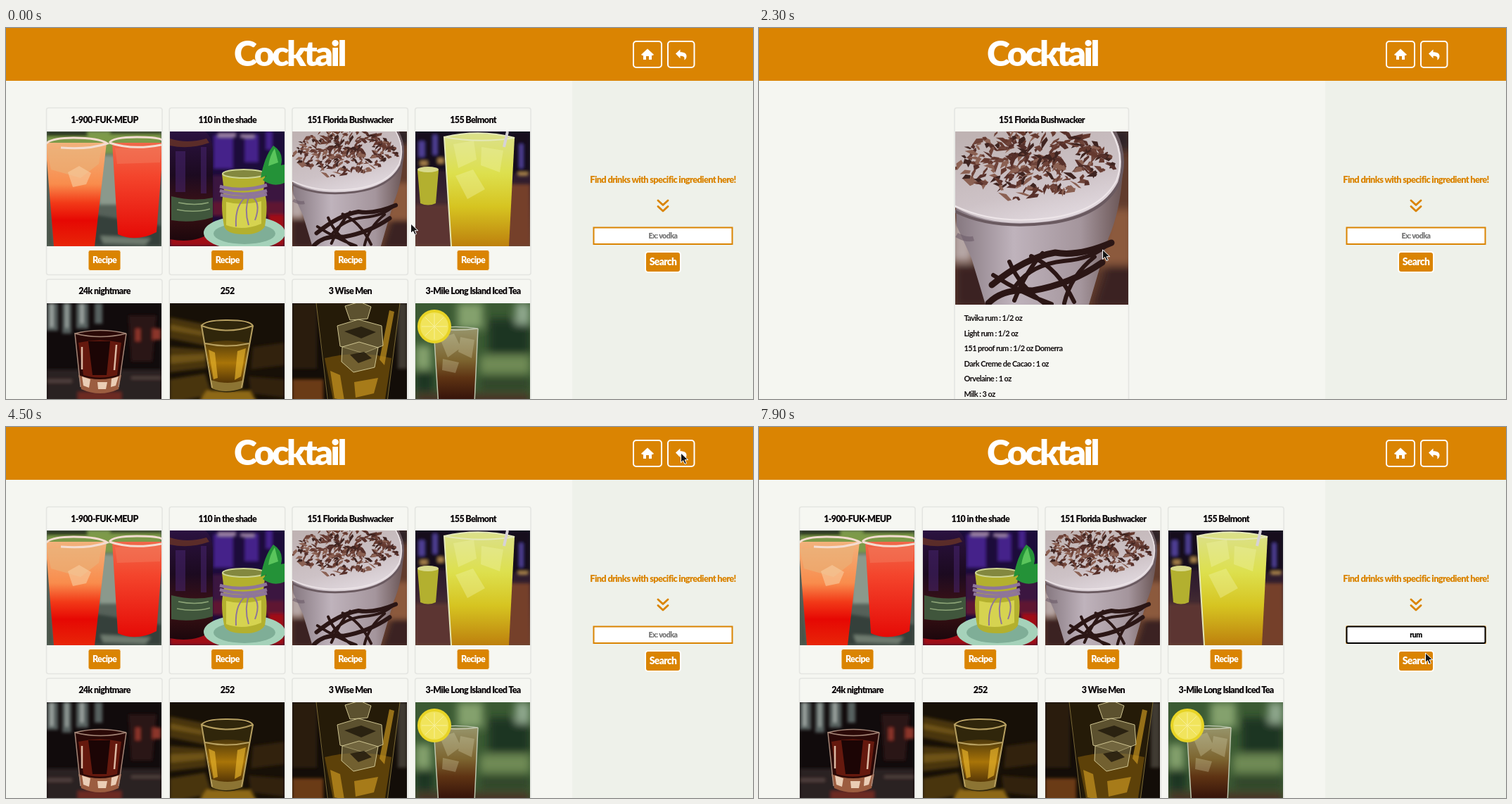
Write an HTML page that moves like this. It is 1062x527 px and loops after 8 s.

```html
<!DOCTYPE html>
<html lang="en">
<head>
<meta charset="utf-8">
<title>Cocktail</title>
<style>
html, body { margin: 0; width: 100%; height: 100%; overflow: hidden; background: #f5f6f1; }
svg.stage { display: block; width: 1062px; height: 527px; }
text { font-family: Lato, "Open Sans", sans-serif; font-weight: 900; letter-spacing: -.05em; text-anchor: middle; }
.title { font-size: 50px; letter-spacing: -.07em; fill: #fff; }
.name { font-size: 12.5px; fill: #0b0709; }
.btn { font-size: 12.5px; fill: #fff; }
.item { font-size: 11px; font-weight: 700; fill: #100b0c; text-anchor: start; }
.field { font-size: 10.5px; }
.card { fill: #f6f7f2; stroke: #e4e5e1; stroke-width: 1.6; }
.recipe { fill: #da8402; stroke: #fbf3e4; }

/* One loop lasts 8 s, so 1.25% is 100 ms. */
.list, .detail, .arrow, .beam, .caret, .hint, .typed, .focus { animation: 8s step-end infinite; }
.list { animation-name: list; }
.detail { animation-name: detail; }
.arrow { animation-name: arrow; }
.beam { animation-name: beam; }
.caret { animation-name: caret; }
.hint { animation-name: hint; }
.focus { animation-name: focus; }
.t1 { animation-name: t1; }
.t2 { animation-name: t2; }
.t3 { animation-name: t3; }

@keyframes list { 0%, 56.25% { opacity: 1 } 17.5% { opacity: 0 } 100% { opacity: 1 } }
@keyframes detail { 0%, 52.5%, 100% { opacity: 0 } 17.5% { opacity: 1 } }
@keyframes focus { 0% { opacity: 0 } 68.75%, 100% { opacity: 1 } }
@keyframes hint { 0% { opacity: 1 } 81.25%, 100% { opacity: 0 } }
@keyframes t1 { 0%, 82.5%, 100% { opacity: 0 } 81.25% { opacity: 1 } }
@keyframes t2 { 0%, 85%, 100% { opacity: 0 } 82.5% { opacity: 1 } }
@keyframes t3 { 0% { opacity: 0 } 85%, 100% { opacity: 1 } }
@keyframes caret {
  0%, 76.25%, 92.5%, 100% { opacity: 0; transform: translate(935px, 289px) }
  68.75% { opacity: 1; transform: translate(935px, 289px) }
  81.25% { opacity: 1; transform: translate(937px, 289px) }
  82.5% { opacity: 1; transform: translate(940px, 289px) }
  85% { opacity: 1; transform: translate(944px, 289px) }
}
@keyframes beam {
  0%, 77.5%, 100% { opacity: 0; transform: translate(969px, 298px) }
  72.5% { opacity: 1; transform: translate(967px, 296px) }
  73.75% { opacity: 1; transform: translate(969px, 298px) }
}
@keyframes arrow {
  0% { opacity: 1; transform: translate(575px, 278px) }
  3.75% { transform: translate(551px, 288px) }
  5% { transform: translate(527px, 296px) }
  7.5% { transform: translate(508px, 312px) }
  8.75% { transform: translate(490px, 327px) }
  23.75% { transform: translate(486px, 322px) }
  28.75% { transform: translate(488px, 315px) }
  37.5% { opacity: 1; transform: translate(532px, 299px) }
  38.75% { opacity: 0; transform: translate(532px, 299px) }
  42.5% { opacity: 1; transform: translate(956px, 25px) }
  43.75% { transform: translate(957px, 31px) }
  45% { transform: translate(959px, 37px) }
  60% { transform: translate(960px, 60px) }
  61.25% { transform: translate(963px, 110px) }
  62.5% { transform: translate(966px, 170px) }
  63.75% { transform: translate(966px, 225px) }
  65% { transform: translate(963px, 262px) }
  66.25% { opacity: 1; transform: translate(960px, 282px) }
  72.5% { opacity: 0; transform: translate(960px, 282px) }
  95% { opacity: 1; transform: translate(961px, 293px) }
  96.25% { transform: translate(957px, 303px) }
  97.5% { transform: translate(952px, 313px) }
  98.75%, 100% { opacity: 1; transform: translate(947px, 321px) }
}
</style>
</head>
<body>
<svg class="stage" viewBox="0 0 1062 527">
  <defs>
    <filter id="soft" x="-20%" y="-20%" width="140%" height="140%"><feGaussianBlur stdDeviation="2"/></filter>
    <filter id="haze" x="-20%" y="-20%" width="140%" height="140%"><feGaussianBlur stdDeviation="6"/></filter>
    <linearGradient id="punch" x2="0" y2="1"><stop stop-color="#f2b27c"/><stop offset=".4" stop-color="#f98c4c"/><stop offset=".58" stop-color="#f23a18"/><stop offset=".75" stop-color="#e60803"/><stop offset="1" stop-color="#e82508"/></linearGradient>
    <linearGradient id="punch2" x2="0" y2="1"><stop stop-color="#f0684a"/><stop offset=".35" stop-color="#f4452c"/><stop offset="1" stop-color="#e50a06"/></linearGradient>
    <linearGradient id="lime" x2="0" y2="1"><stop stop-color="#dbe08a"/><stop offset=".35" stop-color="#dde04e"/><stop offset=".65" stop-color="#d6c421"/><stop offset="1" stop-color="#bd800d"/></linearGradient>
    <linearGradient id="bar" x2="0" y2="1"><stop stop-color="#150d24"/><stop offset=".5" stop-color="#35202f"/><stop offset="1" stop-color="#6b4a38"/></linearGradient>
    <linearGradient id="foam" x1=".2" x2=".7" y2="1"><stop stop-color="#bfb3b3"/><stop offset=".6" stop-color="#cdc2c6"/><stop offset="1" stop-color="#e4dce2"/></linearGradient>
    <linearGradient id="mug" x2="1"><stop stop-color="#85777f"/><stop offset=".35" stop-color="#bfb3bc"/><stop offset=".75" stop-color="#a4959c"/><stop offset="1" stop-color="#6a5555"/></linearGradient>
    <linearGradient id="bottle" x2="0" y2="1"><stop stop-color="#2b1240"/><stop offset=".4" stop-color="#1c0a20"/><stop offset=".7" stop-color="#3d1215"/><stop offset="1" stop-color="#1c070c"/></linearGradient>
    <linearGradient id="whisky" x2="0" y2="1"><stop stop-color="#4e390b"/><stop offset=".5" stop-color="#a87408"/><stop offset="1" stop-color="#4c2f06"/></linearGradient>
    <linearGradient id="tea" x2="0" y2="1"><stop stop-color="#97946a"/><stop offset=".35" stop-color="#7d6530"/><stop offset=".55" stop-color="#5e3313"/><stop offset=".8" stop-color="#34120a"/><stop offset="1" stop-color="#240c08"/></linearGradient>

    <symbol id="p0" viewBox="0 0 163 163">
      <path fill="#566159" d="M0 0h163v163H0z"/>
      <g filter="url(#soft)"><path fill="#7d9a48" d="M0 0h163v32H0z"/><path fill="#26311f" d="M0 0h58v7H0zM90 0h73v4H90z"/><path fill="#8b998c" d="M74 34h24l6 70H74z"/><path fill="#343f3b" d="M66 118l97 16v29H60z"/><path fill="#6e7a6e" d="M76 148l72 4-8 9-60-2z"/><path fill="#4a544a" d="M0 84l10 79H0z"/></g>
      <path fill="url(#punch)" d="M-2 16L85 16L68 163H10Z"/>
      <path fill="#eab27a" opacity=".6" d="M0 26l78-6-4 26-26 20L6 54z"/>
      <path fill="#f9cda0" opacity=".6" d="M30 58l16-9 17 10-7 16-19 4z"/>
      <path fill="url(#punch2)" d="M93 16L166 16L156 143Q127 158 101 146Z"/>
      <path fill="#f47a5c" opacity=".5" d="M97 24l66-2-2 22-61 2z"/>
      <g fill="none" stroke="#f4dcd0" stroke-width="3"><path d="M-3 20Q2 9 38 9T86 17Q60 26 20 23"/><path d="M89 16Q94 8 128 8t37 5M89 16q32 11 74 3"/></g>
    </symbol>

    <symbol id="p1" viewBox="0 0 163 163">
      <path fill="#1c0c3a" d="M0 0h163v163H0z"/>
      <g filter="url(#soft)"><path fill="#44208a" d="M62 5h28v48H62zM106 4h20v40h-20zM136 0h10v26h-10z"/><path fill="#9d83a4" d="M68 2h26v6H68zM100 4h20v5h-20z"/><path fill="#3a1440" d="M60 62h103v42H60z"/><path fill="#5e1630" d="M60 100h103v20H60z"/><path fill="#a01018" d="M0 146h163v17H0zM140 118h23v26h-23z"/></g>
      <path fill="url(#bottle)" d="M0 0h50q11 8 11 30v112q-25 18-61 11z"/>
      <path fill="#7e4020" opacity=".6" d="M0 10q24 8 52 0l4 6Q28 26 0 20z"/>
      <path fill="#4a2675" opacity=".5" d="M8 28h14v58H8zM44 22h8v66h-8z"/>
      <path fill="#40563c" d="M2 92q32 8 59 2v28q-30 9-59 4z"/>
      <path stroke="#8ca477" stroke-width="1.500" fill="none" d="M12 101q24 5 43 0M10 111q26 5 47-1"/>
      <ellipse cx="106" cy="144" rx="58" ry="24" fill="#a5d2ba"/><ellipse cx="106" cy="145" rx="44" ry="15" fill="#7fae97"/>
      <path fill="#b3b02e" d="M74 60q31-10 62 0l-3 25q8 12 2 50-8 12-31 11-24 0-27-12-6-32 0-49z"/>
      <path fill="#d6d350" d="M80 100q22 6 50-1v32q-26 11-50 2z"/>
      <ellipse cx="105" cy="60" rx="30" ry="6" fill="#83883f" stroke="#ced493" stroke-width="2"/>
      <g fill="none" stroke="#8e759a" stroke-width="4.500"><path d="M71 78q33 9 67-2M71 84q33 10 67 0M72 90q33 8 66-1"/><path stroke-width="2" d="M112 90q-20 12-18 45M113 90q-8 21-1 43M114 91q17 8 7 35"/></g>
      <g fill="#249238"><path d="M129 66q5-30 18-46 19 12 8 36-12 4-26 10zM132 69q16-21 31-22v26q-16 7-31-4z"/><path fill="#5ac55c" d="M140 49q2-15 9-25l5 20z"/></g>
    </symbol>

    <symbol id="p2" viewBox="0 0 246 246">
      <path fill="#613c2d" d="M0 0h246v246H0z"/>
      <g filter="url(#haze)"><path fill="#8c5a3d" d="M222 110h30v80h-50z"/><path fill="#3b2320" d="M0 190h48v60H0zM215 190h40v60h-60z"/><path fill="#b5a6a4" d="M-5 128h30v57H-5z"/><path fill="#2d2425" d="M220-5h30v32h-24z"/></g>
      <path fill="url(#mug)" d="M0 85L238 60Q234 115 218 151L190 246H43L23 180 2 134Z"/>
      <path fill="url(#foam)" d="M0 0h224q18 30 11 66Q216 112 142 126 56 139 0 108Z"/>
      <path fill="none" stroke="#6a5a60" stroke-width="4" d="M225-3q21 36 8 76-24 47-99 57Q50 140-3 112"/>
      <path fill="none" stroke="#eee6e9" stroke-width="2" d="M222 0q20 35 7 70-24 44-96 53Q54 133-2 105"/>
      <path fill="none" stroke="#6c5c69" stroke-width="7" opacity=".6" d="M2 147q14 8 24 5"/>
      <g id="flakes"></g>
      <g fill="none" stroke="#2b1615" stroke-linecap="round">
        <path stroke-width="9" d="M222 158Q176 178 142 172 100 179 52 218M209 186Q164 217 110 226 68 222 47 244"/>
        <path stroke-width="6" d="M108 177q38 17 61 65M124 173q-23 25-40 67M54 204q42 27 83 41M198 178q-34 27-43 66M218 159q-22 22-64 25-46 5-68 35M77 185q14 35 51 60"/>
      </g>
    </symbol>

    <symbol id="p3" viewBox="0 0 163 163">
      <path fill="url(#bar)" d="M0 0h163v163H0z"/>
      <g filter="url(#soft)"><path fill="#120c1f" d="M0 0h48v54H0zM136 0h27v60h-27z"/><path fill="#503f95" d="M5 14h8v22H5zM25 5h6v28h-6zM148 18h5v34h-5z"/><path fill="#a9824b" d="M7 42h10v6H7zM32 38h8v7h-8zM146 58h14v5h-14z"/><path fill="#74402c" d="M130 75h33v88h-33z"/><path fill="#5b3530" d="M0 104h53v59H0z"/></g>
      <path fill="#b3b02f" d="M3 55h30l-4 47q-11 5-22 0z"/><ellipse cx="18" cy="54" rx="15" ry="4" fill="#d8d98b"/>
      <path fill="url(#lime)" d="M41 8q50-11 100 1l-8 154H51Z"/>
      <path fill="#eef0a1" opacity=".4" d="M54 18l29-5 4 27-26 12zM94 22l31 5-5 31-27-10zM57 63l25-9 17 28-25 14z"/>
      <path fill="none" stroke="#e4e8b8" stroke-width="2" d="M41 8q50-12 100 1-50 8-100-1l10 155"/>
      <path stroke="#d6d2d6" stroke-width="4" d="M131 0l-5 22"/>
    </symbol>

    <symbol id="p4" viewBox="0 0 163 163">
      <path fill="#110b0c" d="M0 0h163v163H0z"/>
      <g filter="url(#soft)"><path fill="#57605e" d="M0 0h16v39H0zM22 0h13v43H22zM42 0h17v36H42zM68 0h11v29H68z"/><path fill="#a5ada9" d="M5 0h4v34H5zM27 0h3v35h-3zM48 0h4v29h-4z"/><path fill="#2c1216" d="M116 17h40l-6 66h-30z"/><path fill="#8b342c" d="M126 36h7v18h-7zM150 36h12v16h-12z"/><path fill="#2a2224" d="M0 94h163v69H0z"/><path fill="#51403e" d="M0 108h36v5H0zM120 104h43v4h-43z"/><path fill="#6c2921" d="M44 126h62v12H44z"/></g>
      <path fill="#2b0907" d="M40 43q36-9 73 0l-9 68q-27 15-57 0z"/>
      <path fill="#65190e" d="M45 56q30-7 61 0l-6 46q-25 7-48 0z"/>
      <path fill="#1c0505" d="M59 54h31l-5 48H65z"/>
      <path fill="#9c5d40" d="M45 102q31 12 61 0l-4 20q-26 12-53 0z"/>
      <path fill="#eacdb5" d="M50 104l12 4-2 12-8-3zM72 112h14l-2 10H73zM92 107l10-3-4 13-7 2z"/>
      <path fill="none" stroke="#a58778" stroke-width="1.500" d="M40 43q36-9 73 0-37 9-73 0l8 76M113 43l-11 76"/>
      <path fill="none" stroke="#dcb9a4" stroke-width="2.500" d="M50 62v32M99 59l-3 36"/>
    </symbol>

    <symbol id="p5" viewBox="0 0 163 163">
      <path fill="#171007" d="M0 0h163v163H0z"/>
      <g filter="url(#soft)"><path fill="#4a3610" d="M0 20l50 10v30L0 50zM0 62l52 4v26L0 98zM0 108l50-8 10 30-60 12z"/><path fill="#6e5319" d="M0 74l50-2v9L0 86zM0 30l46 10v6L0 38z"/><path fill="#8d6812" d="M52 124h62l24 39H26z"/><path fill="#33240c" d="M118 62l45-6v32l-48 6zM112 104l51 4v26l-48-6z"/></g>
      <path fill="#30260b" d="M45 32q37-14 73 0l-14 90q-24 9-44 0z"/>
      <path fill="url(#whisky)" d="M49 57q32-8 65 0l-11 55q-22 9-42 0z"/>
      <path fill="#e3b02a" opacity=".7" d="M55 66l9 4 4 36-6 2zM96 68l12-4-7 40-9 5z"/>
      <path fill="#8c7433" d="M58 109q24 8 47 0l-3 12q-23 8-42 0z"/>
      <path fill="none" stroke="#b7a061" stroke-width="2" d="M45 32q5-8 37-8t36 8q-36 13-73 0l15 88M118 32l-16 88M50 57q31 7 63 0"/>
    </symbol>

    <symbol id="p6" viewBox="0 0 163 163">
      <path fill="#130d08" d="M0 0h163v163H0z"/>
      <g filter="url(#soft)"><path fill="#2b1a0f" d="M0 0h35v93H0z"/><path fill="#6a3a13" d="M0 108h44v55H0z"/><path fill="#3f3b30" d="M150 0h13v93h-13z"/></g>
      <path fill="#251b08" d="M34 0h119l-18 142q-40 20-82 0z"/>
      <path fill="#5d4109" d="M46 78q48-12 95 0l-10 64q-35 15-72 0z"/>
      <path fill="#c79420" opacity=".7" d="M54 96l14 6 6 36-14-3zM138 10l7 2-14 76-7-8zM88 112l34-6-6 22-26 6z"/>
      <g fill="#80754a" fill-opacity=".6" stroke="#cfc592"><path d="M64 32l30-9 33 9 2 28-28 11-33-10z"/><path d="M71 62l24-7 27 8-5 28-30 7-17-15z"/><path d="M75 4l21-6 16 7-5 17-25 2z"/></g>
      <path fill="#1e170a" opacity=".8" d="M74 40l24-7 21 8-21 9zM82 73l20-4 11 9-19 7z"/>
      <path stroke="#7c6a35" fill="none" d="M34 0l17 142M153 0l-18 140"/>
    </symbol>

    <symbol id="p7" viewBox="0 0 163 163">
      <path fill="#3b5a33" d="M0 0h163v163H0z"/>
      <g filter="url(#haze)"><path fill="#84a16d" d="M60 0h36v36H60zM0 60h22v34H0z"/><path fill="#1c3620" d="M104 22h59v50h-59zM0 96h26v30H0z"/><path fill="#8fa78d" d="M142 0h21v30h-21z"/><path fill="#6f8a55" d="M92 74h71v26H92z"/><path fill="#33472a" d="M92 104h71v20H92z"/><path fill="#4a3427" d="M0 128h163v35H0z"/></g>
      <path fill="url(#tea)" d="M26 36h63l-6 127H34Z"/>
      <path fill="#d6d5ae" opacity=".3" d="M35 50l20-7 10 20-19 14zM64 48l20 4-4 26-19-9zM39 79l23 5-5 15-19-4z"/>
      <path fill="none" stroke="#bdc5ad" stroke-width="1.500" d="M26 36q31-5 63 0-31 4-63 0l8 127M89 36l-6 127"/>
      <circle cx="27" cy="33" r="24" fill="#e8d425"/><circle cx="27" cy="33" r="20" fill="#f1e45c"/>
      <path stroke="#f8f09a" d="M27 15v36M9 33h36M14 20l26 26M40 20L14 46"/>
    </symbol>
  </defs>

  <path fill="#f5f6f1" d="M0 0h1062v527H0z"/>
  <path fill="#eef1ea" d="M805 74h257v453H805z"/>
  <path fill="#da8402" d="M0 0h1062v75H0z"/>
  <text class="title" x="402.500" y="54">Cocktail</text>
  <g fill="none" stroke="#fff" stroke-width="2"><rect x="892" y="19" width="40" height="37" rx="4"/><rect x="941" y="19" width="37.500" height="37" rx="4"/></g>
  <path fill="#fff" d="M912 29.500l9 8.200-1.200 1.400H918v6h-4v-5h-4v5h-4v-6h-1.800l-1.200-1.400z"/>
  <path fill="#fff" d="M952 36.500l6.500-6v3.700c6 0 9 2 9 6 0 2.400-1.400 4.300-3.300 5.300 1.200-4-.5-5.700-5.700-5.700v3.500z"/>

  <g class="list" id="list"></g>

  <g class="detail">
    <rect class="card" x="278" y="113.500" width="247.500" height="520" rx="3"/>
    <text class="name" x="402" y="134.500">151 Florida Bushwacker</text>
    <use href="#p2" x="279" y="147" width="246" height="246"/>
    <g id="items"></g>
  </g>

  <text x="934" y="220" font-size="12.800" fill="#da8402">Find drinks with specific ingredient here!</text>
  <path fill="none" stroke="#da8402" stroke-width="2.800" stroke-linecap="round" stroke-linejoin="round" d="M927 245l7 6.500 7-6.500M927 253.500l7 6.500 7-6.500"/>
  <rect x="835.500" y="283.500" width="197" height="23.500" fill="#fff" stroke="#da8402" stroke-width="2"/>
  <rect class="focus" x="835.500" y="283.500" width="197" height="23.500" rx="2" fill="#fff" stroke="#000" stroke-width="2"/>
  <text class="field hint" x="934" y="298.500" fill="#757575">Ex: vodka</text>
  <g class="field">
    <text class="typed t1" x="934" y="298.500">r</text>
    <text class="typed t2" x="934" y="298.500">ru</text>
    <text class="typed t3" x="934" y="298.500">rum</text>
  </g>
  <path class="caret" stroke="#000" d="M.5 0v12"/>
  <rect x="909" y="318" width="50" height="29" rx="4" fill="#da8402" stroke="#fff" stroke-width="2"/>
  <text class="btn" x="934" y="336.500" style="font-size:14px">Search</text>

  <path class="beam" fill="none" stroke="#222" d="M-3-5.500h2.500L.5-5l1-.5H4M.5-5v11M-3 6.500h2.500L.5 6l1 .5H4"/>
  <path class="arrow" fill="#141414" stroke="#fff" d="M.5 0V13.600l3.200-3 2.300 5 2.400-1-2.200-4.900h4.500z"/>
</svg>
<script>
const byId = id => document.getElementById(id);
const drinks = ["1-900-FUK-MEUP", "110 in the shade", "151 Florida Bushwacker", "155 Belmont",
  "24k nightmare", "252", "3 Wise Men", "3-Mile Long Island Iced Tea"];
const items = ["Tavika rum : 1/2 oz", "Light rum : 1/2 oz", "151 proof rum : 1/2 oz Domerra",
  "Dark Creme de Cacao : 1 oz", "Orvelaine : 1 oz", "Milk : 3 oz"];

byId("list").innerHTML = drinks.map((name, i) => {
  const x = 57.5 + (i % 4) * 174.7, y = i < 4 ? 113.5 : 357;
  const mid = x + 82.5;
  return `<rect class="card" x="${x}" y="${y}" width="164.5" height="237" rx="3"/>
    <text class="name" x="${mid}" y="${y + 21}">${name}</text>
    <use href="#p${i}" x="${Math.round(x + .4)}" y="${Math.round(y + 33.5)}" width="163" height="163"/>
    <rect class="recipe" x="${mid - 23}" y="${y + 202}" width="46" height="29" rx="3"/>
    <text class="btn" x="${mid}" y="${y + 220.5}">Recipe</text>`;
}).join("");

byId("items").innerHTML = items.map((text, i) =>
  `<text class="item" x="291.5" y="${416 + i * 21.6}">${text}</text>`).join("");

// Chocolate shavings scattered over the foam, thickest in the middle
let seed = 7;
const rand = () => (seed = seed * 16807 % 2147483647) / 2147483647;
const browns = ["#57302a", "#6e4339", "#3f2420", "#8b6153", "#65392f"];
let flakes = "";
for (let i = 0; i < 300; i++) {
  const a = rand() * 2 * Math.PI, r = Math.pow(rand(), .7);
  const x = 112 + 112 * r * Math.cos(a), y = 47 + 50 * r * Math.sin(a);
  const w = 6 + rand() * 16, h = 2 + rand() * 4;
  flakes += `<path fill="${browns[i % 5]}" transform="translate(${x} ${y}) rotate(${rand() * 130 - 80})" d="M${-w / 2} 0L0 ${-h}L${w / 2} ${-h / 3}L${w / 3} ${h / 2}Z"/>`;
}
byId("flakes").innerHTML = flakes;
</script>
</body>
</html>
```
